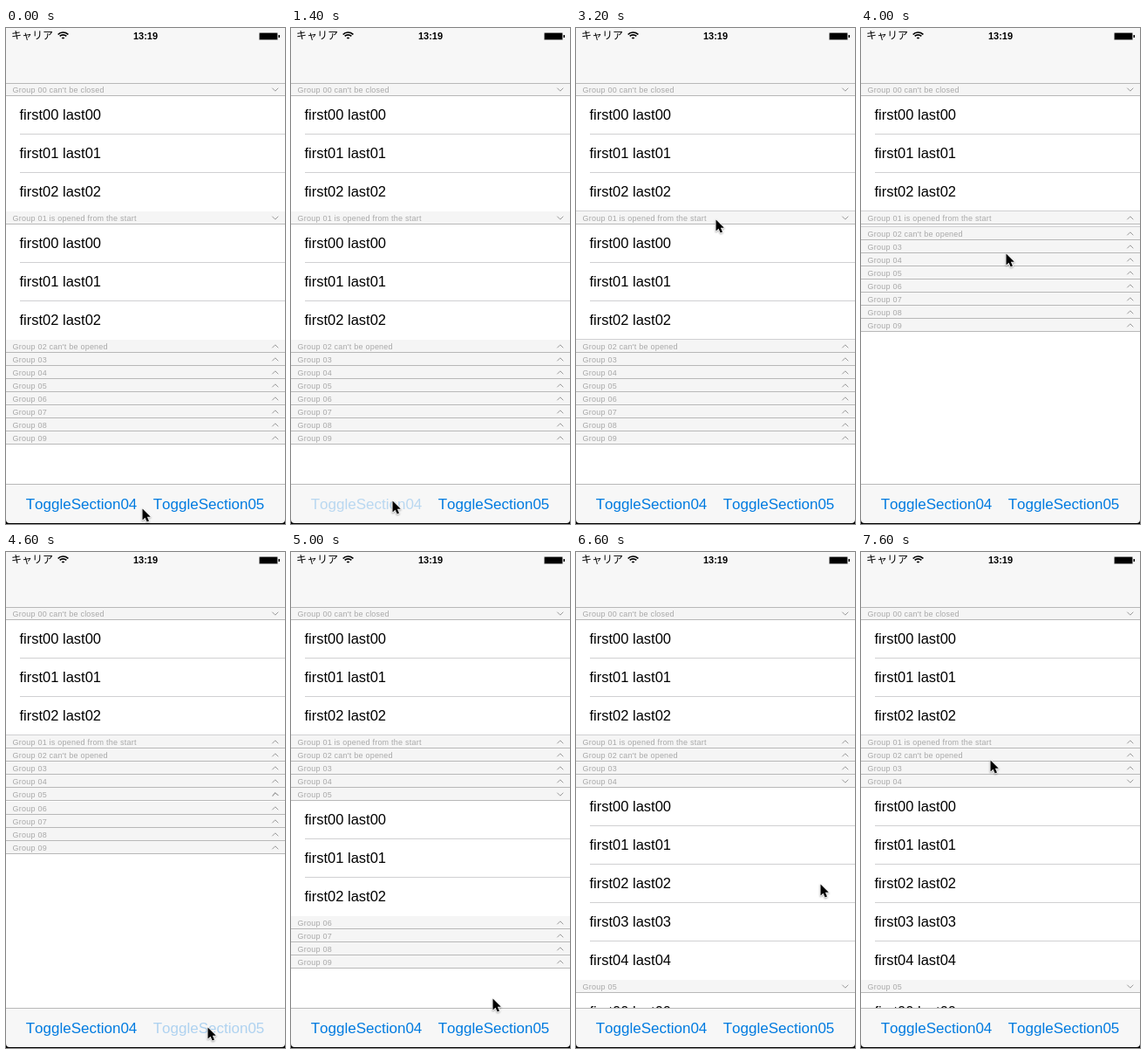
Animation of 320x568 px, one loop 7800 ms. Source, as an HTML page with a canvas:

```html
<!DOCTYPE html>
<html lang="ja">
<head>
<meta charset="utf-8">
<style>
html, body { margin: 0; width: 100%; height: 100%; overflow: hidden; background: #fff; }
canvas { display: block; }
</style>
</head>
<body>
<canvas id="stage" width="320" height="568"></canvas>
<script>
const ctx = document.getElementById('stage').getContext('2d');
const LOOP = 7800, STEP = 200, FOLD = 300, SPIN = 150;
const BAR = '#f7f7f7', LINE = '#b8b8b8', THIN = '#d0d0d2';
const SANS = '"Liberation Sans", Arial, sans-serif';

const notes = [" can't be closed", ' is opened from the start', " can't be opened"];
const rowCounts = [3, 3, 0, 0, 5, 3, 0, 0, 0, 0];

// Each tap flips its group, either by toolbar button or by header
const taps = [
  { group: 4, time: 1483, button: true },
  { group: 4, time: 2170, button: true },
  { group: 1, time: 3729 },
  { group: 5, time: 4583, button: true },
  { group: 4, time: 5583 }
];

// Pointer stops: [time, x, y]
const stops = [
  [0, 156, 550], [200, 192, 547], [800, 55, 545], [1000, 116, 541], [2400, 116, 541],
  [3200, 160, 219], [3800, 161, 215], [4000, 166, 258], [4500, 231, 544], [4800, 231, 544],
  [5000, 231, 511], [5500, 180, 266], [5800, 178, 265], [6200, 180, 41], [6600, 280, 380],
  [7200, 115, 525], [7400, 140, 208], [7600, 148, 238]
];

const clamp = v => Math.min(1, Math.max(0, v));
const ease = v => (1 - Math.cos(Math.PI * clamp(v))) / 2;
const mix = (a, b, k) => a + (b - a) * k;

function groupAt(g, t) {
  const past = taps.filter(tap => tap.group === g && tap.time <= t);
  const opened = (g < 2) !== (past.length % 2 === 1);
  const age = past.length ? t - past[past.length - 1].time : LOOP;
  const toward = span => opened ? ease(age / span) : 1 - ease(age / span);
  return { open: toward(FOLD), turn: toward(SPIN), closing: !opened };
}

function pointerAt(t) {
  const i = stops.findIndex(s => s[0] > t);
  if (i < 0) return stops[stops.length - 1].slice(1);
  const [t0, x0, y0] = stops[i - 1], [t1, x1, y1] = stops[i];
  const k = ease((t - t0) / (t1 - t0));
  return [mix(x0, x1, k), mix(y0, y1, k)];
}

function buttonAlpha(g, t) {
  const tap = taps.find(p => p.button && p.group === g && t >= p.time - 100 && t < p.time + 300);
  return tap ? mix(0.25, 1, clamp((t - tap.time) / 300)) : 1;
}

function rect(x, y, w, h, color) {
  ctx.fillStyle = color;
  ctx.fillRect(x, y, w, h);
}

function text(s, x, y, font, color, align = 'left') {
  ctx.font = font;
  ctx.fillStyle = color;
  ctx.textAlign = align;
  ctx.fillText(s, x, y);
}

function drawRows(top, bottom, count, open, closing) {
  ctx.save();
  ctx.beginPath();
  ctx.rect(0, top, 320, bottom - top);
  ctx.clip();
  if (closing) ctx.globalAlpha = open;
  for (let i = count - 1; i >= 0; i--) {
    const lag = closing ? i : Math.max(i, 1) + count * 0.48;
    const y = Math.round(top + 44 * (i - (1 - open) * lag));
    rect(0, y, 320, 44, '#fff');
    if (i < count - 1) rect(16, y + 43, 304, 1, THIN);
    text(`first0${i} last0${i}`, 15.5, y + 27, '16.5px ' + SANS, '#000');
  }
  ctx.restore();
}

function drawHeader(g, y, turn) {
  rect(0, y, 320, 14, '#f5f5f5');
  rect(0, y + 14, 320, 1, LINE);
  ctx.letterSpacing = '0.23px';
  text(`Group 0${g}${notes[g] || ''}`, 7.5, y + 11, '9px ' + SANS, '#a8a8a8');
  ctx.letterSpacing = '0px';
  ctx.save();
  ctx.translate(308.8, y + 7.5);
  ctx.rotate(-Math.PI * turn);
  ctx.beginPath();
  ctx.moveTo(-3.5, 1.8);
  ctx.lineTo(0, -1.7);
  ctx.lineTo(3.5, 1.8);
  ctx.strokeStyle = '#999';
  ctx.lineWidth = 1;
  ctx.stroke();
  ctx.restore();
}

function drawTable(t) {
  let y = 63;
  rowCounts.forEach((count, g) => {
    const { open, turn, closing } = groupAt(g, t);
    const next = Math.round(y + 15 + 44 * count * open);
    if (open) drawRows(y + 15, next, count, open, closing);
    drawHeader(g, y, turn);
    // The first update brings in the line below the last row
    if (g < 2 && open && t > taps[0].time) rect(0, next - 1, 320, 1, THIN);
    y = next;
  });
}

function drawStatus() {
  rect(0, 0, 320, 63, BAR);
  rect(0, 63, 320, 1, LINE);
  text('キャリア', 6, 13, '12px "Noto Sans CJK JP", "Noto Sans CJK", sans-serif', '#000');
  text('13:19', 160, 13, 'bold 11px ' + SANS, '#000', 'center');
  ctx.strokeStyle = '#000';
  ctx.lineWidth = 1.7;
  for (const r of [8, 5.2, 1.6]) {
    ctx.beginPath();
    ctx.arc(65.5, 13, r, -Math.PI * 0.76, -Math.PI * 0.24);
    ctx.stroke();
  }
  ctx.beginPath();
  ctx.roundRect(290, 5, 22, 9, 1.5);
  ctx.fillStyle = 'rgba(0,0,0,.4)';
  ctx.fill();
  rect(291, 6, 20, 7, '#000');
  rect(312.5, 8, 1.5, 3, '#000');
}

function drawToolbar(t) {
  rect(0, 522, 320, 46, BAR);
  rect(0, 522, 320, 1, LINE);
  [4, 5].forEach((g, i) => {
    ctx.globalAlpha = buttonAlpha(g, t);
    text('ToggleSection0' + g, 22.7 + 146 * i, 551, '17px ' + SANS, '#007be0');
  });
  ctx.globalAlpha = 1;
  // Dark rounded edge below the screen
  ctx.beginPath();
  ctx.rect(0, 540, 320, 28);
  ctx.roundRect(0, 540, 320, 27, [0, 0, 4, 4]);
  ctx.fillStyle = '#000';
  ctx.fill('evenodd');
}

function drawPointer([x, y]) {
  const shape = new Path2D('M.5 .5V13.5L3.5 10.7L5.7 15.5L8 14.5L5.9 9.8H9.8Z');
  ctx.save();
  ctx.translate(Math.round(x), Math.round(y));
  ctx.lineJoin = 'round';
  ctx.lineWidth = 1.6;
  ctx.strokeStyle = '#fff';
  ctx.shadowColor = 'rgba(0,0,0,.35)';
  ctx.shadowBlur = 2;
  ctx.shadowOffsetY = 1;
  ctx.stroke(shape);
  ctx.shadowColor = 'transparent';
  ctx.fillStyle = '#000';
  ctx.fill(shape);
  ctx.restore();
}

const start = performance.now();
function tick() {
  const t = Math.floor((performance.now() - start) % LOOP / STEP) * STEP;
  ctx.fontKerning = 'none';
  rect(0, 0, 320, 568, '#fff');
  drawTable(t);
  drawStatus();
  drawToolbar(t);
  drawPointer(pointerAt(t));
  requestAnimationFrame(tick);
}
tick();
</script>
</body>
</html>
```
